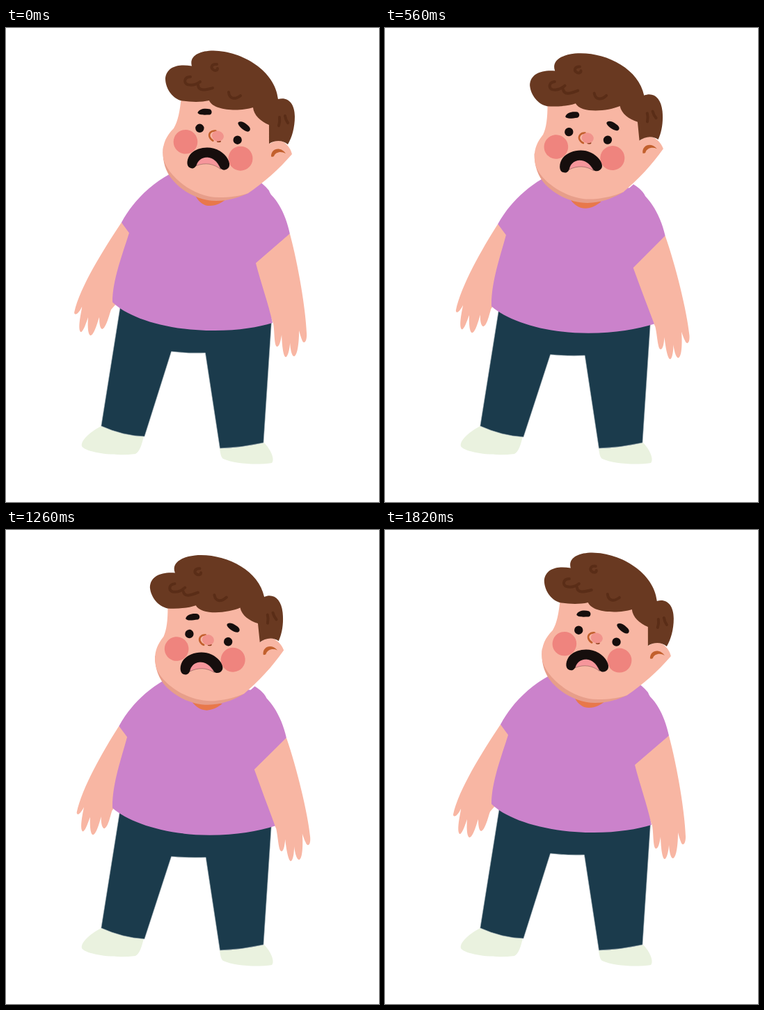
Recreate the animation shown at these times as an HTML page. Size 536 by 680 pixels, loop 1.89 s.

```html
<!DOCTYPE html>
<html lang="en">
<head>
<meta charset="utf-8">
<title>Swaying boy</title>
<style>
  html, body { margin: 0; width: 100%; height: 100%; overflow: hidden; background: #fff; }
  svg { display: block; width: 100%; height: 100%; }
  .skin { fill: #f8b6a3; }
  .shirt { fill: #cb82cb; }
  .pants { fill: #1b3b4c; stroke: #a9b5bb; stroke-width: .6; }
  .shoe { fill: #eaf2df; }
  .neck { fill: #e8784b; }
  .shade { fill: #e79e8a; }
  .hair { fill: #693921; }
  .ink { fill: #160e0d; }
  .cheek { fill: #ef847e; }
  .nose { fill: #f1938c; }
  .tongue { fill: #f6969b; stroke: #160e0d; stroke-width: .3; }
  .ear { fill: #c2602d; }
  .line { fill: none; stroke: #c2602d; stroke-width: 2.6; stroke-linecap: round; }
  .curl { stroke: #5a2d17; stroke-width: 4; stroke-linejoin: round; }
</style>
</head>
<body>
<svg viewBox="0 0 536 680">
  <g class="shoe">
    <path d="M137 571C120 580 107 592 109 600C113 608 152 615 186 611C192 608 195 598 198 586Q168 584 137 571Z"/>
    <path d="M307 603C308 610 309 616 312 618C330 626 362 627 382 624C387 619 380 604 371 595Q339 602 307 603Z"/>
  </g>
  <path id="pants" class="pants"/>
  <path id="leftArm" class="skin"/>
  <path id="rightArm" class="skin" d="M408 295C420 340 431 405 432 440C432 452 427 454 425 447C423 442 421 434 421 434C421 450 419 469 414 471C409 471 408 452 408 451C408 455 406 471 402 472C397 472 396 442 396 440C395 446 393 458 389 457C385 455 386 436 384 424L350 330Z"/>
  <path id="shirt" class="shirt"/>
  <path id="neck" class="neck"/>

  <g id="head">
    <path class="shade" d="M226 170C224 187 228 203 237 215C249 231 274 248 302 248C320 248 335 243 348 237L300 180Z"/>
    <path class="skin" d="M252 98C250 120 247 134 241 144C228 157 224 170 226 186C230 210 268 243 306 243C322 243 336 241 348 237C370 222 392 203 411 181C409 172 403 166 398 163C391 160 384 162 379 166L384 130L355 80L270 70Z"/>
    <path class="hair" d="M251 104C238 100 229 86 229 72C231 55 248 51 267 54.5C263 40 278 32.5 298 32.5C340 33 387 62 391 102C405 98 415 108 415 127C415 143 411 157 405 167C397 160 386 161 378 166L378 139C366 134 356 125 355 114C336 120 298 119 292 104C279 107 263 106 251 104Z"/>
    <g class="line curl">
      <path d="M303 52C296 51 294 56 297 59C300 62 304 61 304 58"/>
      <path d="M265 70C256 70 255 79 261 81C268 83 275 80 279 77"/>
      <path d="M276 82C277 91 286 89 297 86"/>
      <path d="M320 92C321 102 329 103 337 97"/>
      <path d="M393 128Q394 134 392 140M401 126Q402 132 405 136"/>
    </g>
    <path class="ear" d="M381 184C381 173 394 169 402 180C395 176 387 178 385 184C384 185 381 185 381 184Z"/>
    <g transform="translate(.4 .5)">
      <circle class="cheek" cx="257.6" cy="162.7" r="17.3"/>
      <circle class="cheek" cx="336.6" cy="186.6" r="17.5"/>
      <g class="ink">
        <circle cx="278" cy="143.2" r="6.2"/>
        <circle cx="332.3" cy="160.1" r="6.2"/>
        <path d="M275 121C277 115 286 114 293 116C297 119 295 124 292 124C285 124 277 125 275 121Z"/>
        <path d="M333 136C334 132 341 133 347 139C352 143 351 147 348 148C343 149 333 140 333 136Z"/>
      </g>
      <path class="line" d="M301 147C294 146 291 151 292 155C293 158 295 160 297 161"/>
      <ellipse cx="305.5" cy="161.8" rx="3" ry="1.6" fill="#8f3f1d"/>
      <ellipse class="nose" cx="304" cy="154.5" rx="8.6" ry="7.4" transform="rotate(17 304 154.5)"/>
      <path class="tongue" d="M273 197C277 180 300 179 308 202C298 194 286 192 273 197Z"/>
      <path class="ink" d="M264 200C258 198 259 186 266 179C276 170 294 168 307 176C317 182 323 193 320 199C317 204 311 204 308 201C303 190 297 186 289 185C280 185 275 190 273 197C270 202 266 201 264 200Z"/>
    </g>
  </g>
</svg>
<script>
  const LOOP = 1890, STEP = 70;

  // Two extreme poses per soft shape, blended number by number
  const poses = {
    pants: [
      "M164.6 397L136.8 571Q168 585 199 586L237.6 464Q262 467 286.4 466L307.4 603Q339 602 370 595L381.5 421Z",
      "M164.6 397L136.8 571Q168 585 199 587L237.6 470Q262 472 287.4 471L307.4 603Q339 602 370 595L381.5 421Z"
    ],
    leftArm: [
      "M166 279C140 318 106 372 98 408C98 413 104 411 109 400C110 400 102 430 107 436C111 438 117 417 118 415C118 415 116 438 121 441C127 442 133 416 134 415C134 418 134 431 138 432C144 431 149 409 151 404L158 396L190 300Z",
      "M161 282C139 317 110 370 103 404C103 409 107 408 113 397C113 398 106 426 111 431C115 433 121 412 122 411C122 411 121 434 126 436C132 436 137 411 138 410C137 413 138 426 142 427C148 426 151 407 153 402L158 395L185 300Z"
    ],
    shirt: [
      "M236 209C205 226 181 251 166 279L177 294C167 326 153 362 153 393C175 415 230 434 300 434C335 434 363 429 383 423C377 395 366 365 359 337L408 295C403 272 394 252 381 239Q379 236 378 233Q374 228 367 222L358 228Z",
      "M222 219C196 235 174 258 161 282L173 298C165 329 152 367 153 401C178 422 230 439 290 439C330 439 362 433 388 425C376 397 366 371 356 346L401 299C396 277 386 257 372 242Q371 239 368 236Q363 230 354 225L349 230Z"
    ],
    neck: [
      "M272 240C278 251 285 255 293 255C303 255 311 250 316 246Z",
      "M265 248C271 256 279 260 287 260C297 259 303 255 309 250Z"
    ]
  };

  const byId = id => document.getElementById(id);
  const number = /[\d.]+/g;

  function blend([from, to], k) {
    const ends = to.match(number);
    let i = 0;
    return from.replace(number, n => (+n + (ends[i++] - n) * k).toFixed(2));
  }

  const sway = t => (1 - Math.cos(2 * Math.PI * t / LOOP)) / 2;

  // The body leads the head slightly, and the head rides on it
  function pose(t) {
    const tilt = sway(t + 21), lean = sway(t + 50) ** .8;
    for (const id in poses) byId(id).setAttribute("d", blend(poses[id], lean));
    byId("head").setAttribute("transform",
      `translate(0 ${5 * (lean - tilt)}) rotate(${-8.25 * tilt} 322 291)`);
    byId("rightArm").setAttribute("transform",
      `translate(${-7 * lean} ${4 * lean}) rotate(${-5.6 * lean} 408 295)`);
  }

  const start = performance.now();
  function draw() {
    pose(Math.floor((performance.now() - start) % LOOP / STEP) * STEP);
    requestAnimationFrame(draw);
  }
  draw();
</script>
</body>
</html>
```
